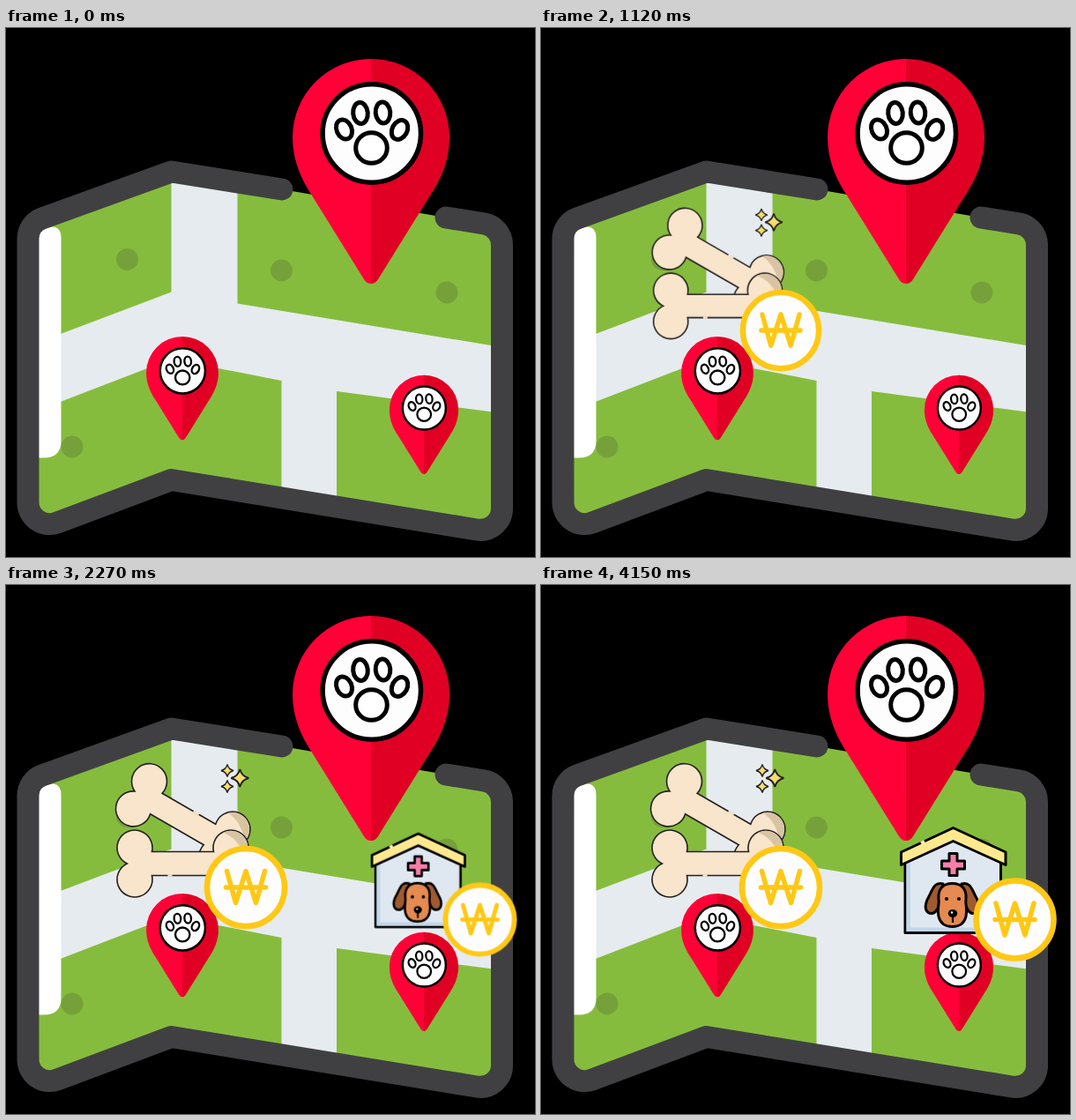
Write an HTML page that moves like this. It is 600 px wide and 600 px high and loops after 4180 ms.

```html
<!DOCTYPE html>
<html lang="en">
<head>
<meta charset="utf-8">
<title>Pet map</title>
<style>
  html, body { margin: 0; width: 100%; height: 100%; overflow: hidden; background: #000; }
  svg { display: block; width: 100vw; height: 100vh; }
  .pop { animation: 4180ms infinite both; }
  .first { animation-name: first; }
  .second { animation-name: second; }
  .bones { transform-origin: 201px 278.5px; }
  .coin1 { transform-origin: 272px 343px; }
  .house { transform-origin: 467.5px 335px; }
  .coin2 { transform-origin: 537.5px 379.5px; }
  /* the bezier is an exact quadratic ease-out */
  @keyframes first {
    0% { transform: scale(0); }
    9.21% { transform: scale(0); animation-timing-function: cubic-bezier(.3333, .6667, .6667, 1); }
    29.78%, 100% { transform: scale(1); }
  }
  @keyframes second {
    0% { transform: scale(0); }
    40.6% { transform: scale(0); animation-timing-function: cubic-bezier(.3333, .6667, .6667, 1); }
    61.17%, 100% { transform: scale(1); }
  }
</style>
</head>
<body>
<svg viewBox="0 0 600 600">
  <defs>
    <g id="pin">
      <path fill="#ff0037" d="M1 0H0A89 89 0 0 0 -89 89C-89 115 -79 137 -67 155L-8 250Q-5 255 0 255H1Z"/>
      <path fill="#e00024" d="M0 0A89 89 0 0 1 89 89C89 115 79 137 67 155L8 250Q5 255 0 255Z"/>
      <g fill="#fff" stroke="#000" stroke-width="5" transform="translate(-.5 -.5)">
        <circle cx="1.3" cy="85" r="55.7" fill="#fdfdfd" stroke-width="5.5"/>
        <ellipse cx="-30" cy="80.5" rx="8.5" ry="11.5" transform="rotate(-24 -30 80.5)"/>
        <ellipse cx="-11.5" cy="62" rx="8.3" ry="12" transform="rotate(-5 -11.5 62)"/>
        <ellipse cx="14" cy="61.5" rx="8.3" ry="12" transform="rotate(-5 14 61.5)"/>
        <ellipse cx="33" cy="81" rx="8.5" ry="11.5" transform="rotate(28 33 81)"/>
        <ellipse cx="1" cy="101.5" rx="17.8" ry="17.3"/>
      </g>
    </g>
    <path id="bone" d="M-35 -13.5A20 20 0 1 0 -63.2 0A20 20 0 1 0 -35 13.5H35A20 20 0 1 0 63.2 0A20 20 0 1 0 35 -13.5Z"/>
    <path id="shade" fill="#d8c4a3" d="M-5 -18.6A19.2 19.2 0 0 1 14 13.2Q10 -9 -5 -18.6Z"/>
    <path id="star" d="M0 -10Q2 -2 10 0Q2 2 0 10Q-2 2 -10 0Q-2 -2 0 -10Z"/>
    <g id="coin" fill="none" stroke="#ffc815" stroke-linecap="round" stroke-linejoin="round">
      <circle r="44" fill="#fdfdfd" stroke-width="6.5"/>
      <path stroke-width="5.5" d="M-21.5 -18.5L-11.5 17.5L0 -18.5L11.5 17.5L21.5 -18.5M-22.5 0H22.5"/>
    </g>
    <path id="outline" d="M499 215L542 221.8A24.5 24.5 0 0 1 562.5 246V545A24.5 24.5 0 0 1 534 569L187.5 512.5L58.1 561A24.5 24.5 0 0 1 25 538V239A24.5 24.5 0 0 1 40.9 216L187.5 163L313 183"/>
  </defs>

  <!-- map -->
  <use href="#outline" fill="#86bc3d"/>
  <path fill="#e6ebef" d="M187.5 160L262.5 175V312.5L556 361V436L375 412V545H312.5V400L187.5 375.5L50 428.5V351.5L187.5 299.5Z"/>
  <g fill="#76a13a">
    <circle cx="137.5" cy="262.5" r="12.5"/>
    <circle cx="312.5" cy="275" r="12.5"/>
    <circle cx="500" cy="300" r="12.5"/>
    <circle cx="75" cy="475" r="12.5"/>
  </g>
  <path fill="#fff" d="M30 487.5V240Q38 227 52 225.5Q62.5 225.5 62.5 238V468Q62.5 487.5 43 487.5Z"/>
  <use href="#outline" fill="none" stroke="#404042" stroke-width="25" stroke-linecap="round" stroke-linejoin="round"/>

  <use href="#pin" transform="translate(414 35)"/>
  <use href="#pin" transform="translate(200 350) scale(.46)"/>
  <use href="#pin" transform="translate(474 393.8) scale(.44)"/>

  <!-- bones -->
  <g class="pop first bones" fill="#f8e5cb" stroke="#231f20" stroke-width="1.6">
    <g transform="translate(200.7 265.5) rotate(30)">
      <use href="#bone"/>
      <path stroke="#f8e5cb" stroke-width="2.4" d="M6 -13.5H13"/>
    </g>
    <use href="#shade" stroke="none" transform="translate(256.8 277.1)"/>
    <g transform="translate(200.5 316)">
      <use href="#bone"/>
      <path stroke="#f8e5cb" stroke-width="2.4" d="M-17 13.5H-12"/>
      <use href="#shade" stroke="none" transform="translate(54.5 -18) rotate(-12)"/>
    </g>
    <g fill="#f3de6d" stroke-width="1.9">
      <use href="#star" transform="translate(265.3 219)"/>
      <use href="#star" transform="translate(251 210.5) scale(.7)"/>
      <use href="#star" transform="translate(251 228.5) scale(.7)"/>
    </g>
  </g>
  <g class="pop first coin1"><use href="#coin" x="272" y="343"/></g>

  <!-- clinic -->
  <g class="pop second house" stroke="#000" stroke-width="3" stroke-linejoin="round">
    <path fill="#dfe8f1" d="M413 305L467 282L521.5 305V394.5H413Z"/>
    <path fill="#c3d7e9" stroke="none" d="M414.5 310H419V388.5H520V393H414.5Z"/>
    <path fill="#ffe98f" d="M467.5 275.5L527 303V317.5L467.5 290.5L408.5 317.5V303Z"/>
    <path stroke="#fff3c0" stroke-width="3.4" d="M431 292.8L435 290.9"/>
    <path fill="#f67fa9" d="M463 304.5H472V313H480.5V322H472V329.5H463V322H454.5V313H463Z"/>
    <path fill="#a05a30" d="M456 339C445 336 444 347 438 357C434 367 437 373 444 372.5C450 371 452 363 453 355Z"/>
    <path fill="#a05a30" d="M477 339C488 336 489 347 495 357C499 367 496 373 489 372.5C483 371 481 363 480 355Z"/>
    <path fill="#e58a50" d="M466.5 338.5C478 338.5 483 346 482 356C481 363 484 367 482 376C480 384 474 387.5 466.5 387.5C459 387.5 453 384 451 376C449 367 452 363 451 356C450 346 455 338.5 466.5 338.5Z"/>
    <path fill="none" stroke-width="2.2" d="M467 374V383"/>
    <g stroke="none">
      <ellipse cx="467" cy="372.5" rx="5.2" ry="4.6"/>
      <circle cx="460" cy="356" r="2.1"/>
      <circle cx="474" cy="356" r="2.1"/>
      <circle cx="466" cy="371.5" r="1.2" fill="#fff"/>
      <path d="M502 385h3v3h-3zM509 385h3v3h-3z"/>
    </g>
  </g>
  <g class="pop second coin2"><use href="#coin" x="537.5" y="379.5"/></g>
</svg>
</body>
</html>
```
